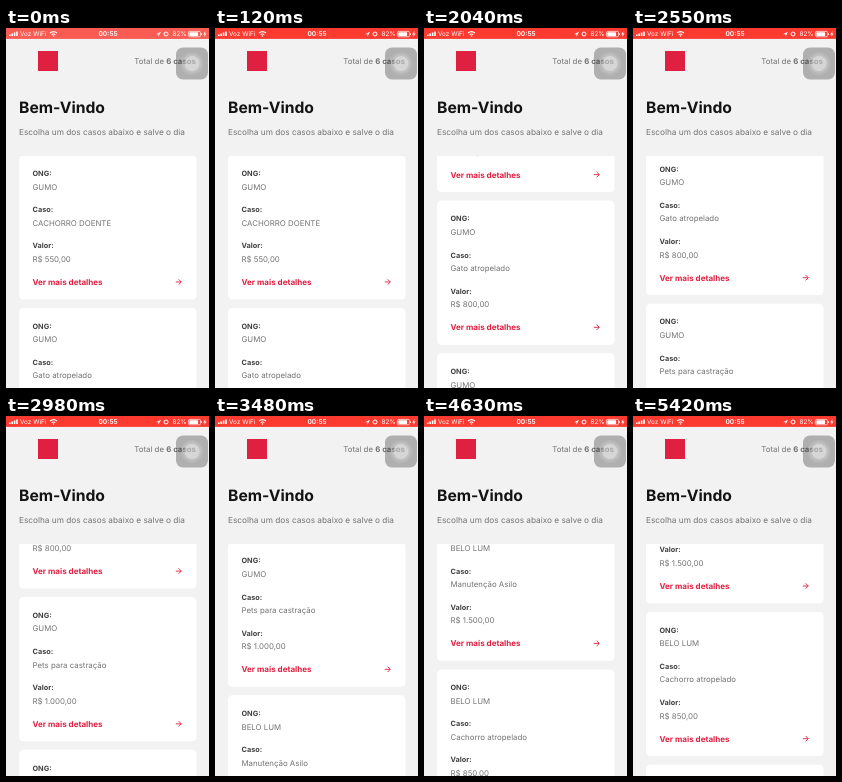
Recreate the animation shown at these times as an HTML page. Size 203 by 360 pixels, loop 5.45 s.

```html
<!DOCTYPE html>
<html lang="pt-BR">
<head>
<meta charset="utf-8">
<title>Casos</title>
<style>
  html, body { margin: 0; width: 100%; height: 100%; overflow: hidden; background: #f2f2f2; }
  svg { display: block; width: 100%; height: 100%; }
  text { font-family: Inter, Roboto, sans-serif; font-size: 7.85px; fill: #737373; text-rendering: geometricPrecision; }
  .bold { font-weight: 700; }
  .title { font-size: 15.7px; fill: #131313; }
  .intro { font-size: 8.25px; }
  .label { font-size: 7.3px; fill: #414141; }
  .link { font-size: 8.05px; fill: #e02041; }
  .status { font-size: 6.4px; fill: #fff; }
  .clock { font-size: 6.7px; font-weight: 600; }
</style>
</head>
<body>
<svg viewBox="0 0 203 360">
  <clipPath id="listArea"><rect y="128" width="203" height="232"/></clipPath>
  <rect width="203" height="360" fill="#f2f2f2"/>

  <g id="statusBar" fill="#fff">
    <rect width="203" height="10.9" fill="#fc3a30"/>
    <path d="M3 8v-1.5h1.6V8zM5.4 8V5.5H7V8zM7.8 8V4.5h1.6V8zM10.2 8V3.5h1.6V8z"/>
    <text class="status" x="14" y="8.2">Voz WiFi</text>
    <path d="M44 5q3.5-2.8 7 0M45.7 6.7q1.8-1.5 3.6 0" fill="none" stroke="#fff" stroke-width="1.1"/>
    <circle cx="47.5" cy="8" r=".8"/>
    <text class="status clock" x="102" y="8.2" text-anchor="middle">00:55</text>
    <path d="M150 6.3l5-2.5-2.5 5v-2.5z"/>
    <circle cx="160" cy="6" r="2" fill="none" stroke="#fff" stroke-width="1"/>
    <text class="status" x="166.5" y="8.2">82%</text>
    <rect x="182.4" y="3.4" width="12.2" height="5.4" rx="1.4" fill="none" stroke="#fff" stroke-width=".7"/>
    <rect x="183.3" y="4.3" width="8.8" height="3.6" rx=".6"/>
    <path d="M195.2 5.2h.8v1.8h-.8zM199.5 3l-2.3 3.4h1.5l-.5 2.6 2.3-3.5h-1.5z"/>
  </g>

  <rect x="32" y="23" width="20" height="20" fill="#e02041"/>
  <text x="190" y="35.5" text-anchor="end">Total de <tspan class="bold">6 casos</tspan></text>
  <text class="bold title" x="13" y="85">Bem-Vindo</text>
  <text class="intro" x="13" y="107.3">Escolha um dos casos abaixo e salve o dia</text>

  <g clip-path="url(#listArea)"><g id="list"></g></g>

  <g id="touchButton">
    <rect x="170" y="19.5" width="32" height="32" rx="7" opacity=".28"/>
    <g fill="#fff">
      <circle cx="186" cy="35.5" r="11.5" opacity=".1"/>
      <circle cx="186" cy="35.5" r="9.5" opacity=".15"/>
      <circle cx="186" cy="35.5" r="7.5" opacity=".35"/>
    </g>
  </g>
</svg>
<script>
const LOOP = 5450, FIRST_MOVE = 1540, STEP = 71.85;
const CARD_PITCH = 152.7, DRAG = 220, DECAY = 500;

// The last card only peeks in at the bottom edge, so it has no text.
const cases = [
  ['GUMO', 'CACHORRO DOENTE', 'R$ 550,00'],
  ['GUMO', 'Gato atropelado', 'R$ 800,00'],
  ['GUMO', 'Pets para castração', 'R$ 1.000,00'],
  ['BELO LUM', 'Manutenção Asilo', 'R$ 1.500,00'],
  ['BELO LUM', 'Cachorro atropelado', 'R$ 850,00'],
  null
];
const labels = ['ONG:', 'Caso:', 'Valor:'];

// Each flick: finger down time, position at release, resting position.
const flicks = [
  { start: 1500, release: 60, rest: 180 },
  { start: 2620, release: 224.5, rest: 337.5 },
  { start: 4120, release: 428, rest: 557 }
];

const text = (kind, y, content) => `<text class="${kind}" x="26.5" y="${y}">${content}</text>`;

const cardText = values =>
  values.map((value, i) =>
    text('bold label', 20 + 36.2 * i, labels[i]) + text('', 33.5 + 36.2 * i, value)).join('') +
  text('bold link', 129, 'Ver mais detalhes') +
  '<path d="M169.8 126h5.4m-2.6-2.7l2.7 2.7-2.7 2.7" fill="none" stroke="#e02041" stroke-width=".9"/>';

const statusBar = document.getElementById('statusBar');
const list = document.getElementById('list');
list.innerHTML = cases.map((values, i) =>
  `<g transform="translate(0 ${128 + i * CARD_PITCH})">
    <rect x="13" y="-.7" width="177.5" height="144.1" rx="4.3" fill="#fff"/>
    ${values ? cardText(values) : ''}
  </g>`).join('');

// Drag linearly with the finger, then coast with exponential decay.
function scrollAt(time) {
  const flick = flicks.filter(f => f.start <= time).pop();
  if (!flick) return 0;
  const { start, release, rest } = flick;
  const elapsed = time - start;
  if (elapsed > DRAG) return rest - (rest - release) * Math.exp((DRAG - elapsed) / DECAY);
  const from = scrollAt(start - 1);
  return from + (release - from) * elapsed / DRAG;
}

function draw(now) {
  const time = now % LOOP;
  const held = FIRST_MOVE + Math.floor((time - FIRST_MOVE) / STEP) * STEP;
  const offset = time < FIRST_MOVE ? 0 : scrollAt(held);
  list.setAttribute('transform', `translate(0 ${-offset})`);
  // The recording bar ends its pulse in two steps.
  statusBar.setAttribute('opacity', time < 70 ? 0.82 : time < 120 ? 0.91 : 1);
  requestAnimationFrame(draw);
}
draw(0);
</script>
</body>
</html>
```
